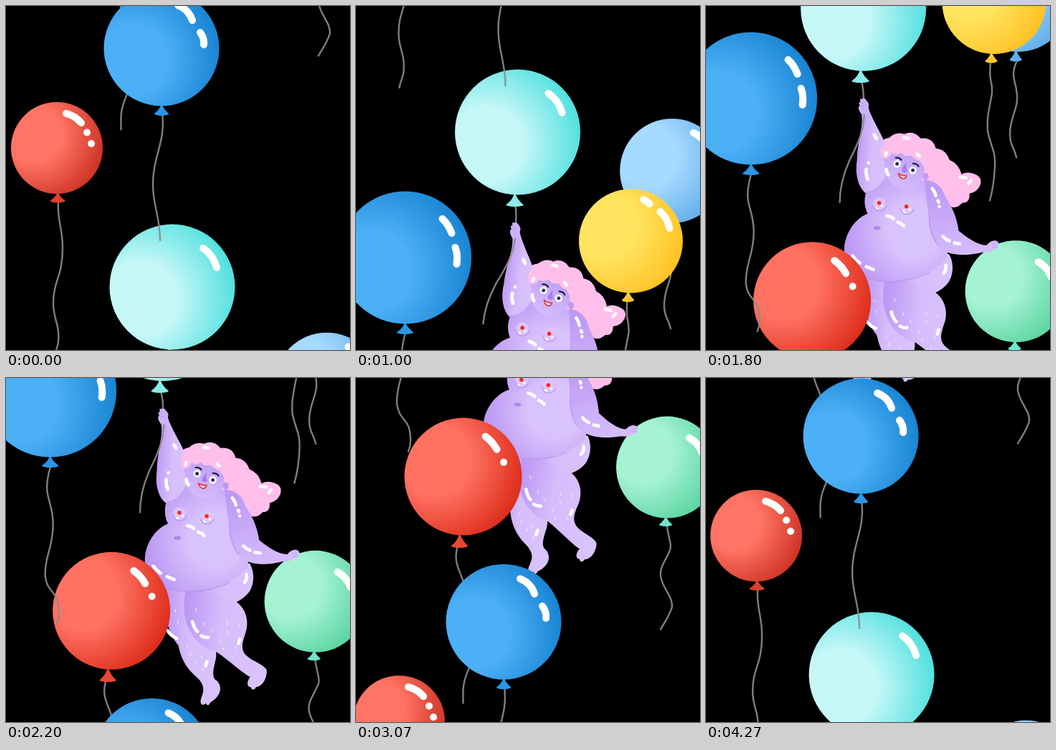
Recreate the animation shown at these times as an HTML page. Size 480 by 480 pixels, loop 4.34 s.

```html
<!DOCTYPE html>
<html lang="en">
<head>
<meta charset="utf-8">
<title>Balloons</title>
<style>
html, body { margin: 0; width: 100%; height: 100%; overflow: hidden; background: #000; }
svg { display: block; width: 100vw; height: 100vh; }
.string { fill: none; stroke: #8c8c8c; stroke-opacity: .9; stroke-width: 2.4; stroke-linecap: round; }
.shine { fill: none; stroke: #fff; stroke-width: 10; stroke-linecap: round; }
.glint { fill: none; stroke: #fff; stroke-width: 4.6; stroke-linecap: round; }
.fuzz { fill: none; stroke: #f6edff; stroke-width: 1; stroke-linecap: round; }
.crease { fill: none; stroke: #b898ee; stroke-width: 1.3; stroke-linecap: round; }
</style>
</head>
<body>
<svg id="stage" viewBox="0 0 480 480">
<defs>
  <radialGradient id="skin" cx=".68" cy=".52" r=".72">
    <stop offset=".35" stop-color="#d9c3fc"/><stop offset="1" stop-color="#b892f3"/>
  </radialGradient>
  <linearGradient id="limb" x2="1" y2=".15">
    <stop stop-color="#b993f2"/><stop offset=".5" stop-color="#d6befc"/><stop offset="1" stop-color="#d9c3fc"/>
  </linearGradient>
  <linearGradient id="reach" x1=".5" y1="0" x2=".8" y2="1">
    <stop stop-color="#bd9af4"/><stop offset=".6" stop-color="#cdb0fa"/><stop offset="1" stop-color="#d6befc"/>
  </linearGradient>
  <linearGradient id="face" x1=".2" y1="1" x2=".6" y2="0">
    <stop stop-color="#d6befc"/><stop offset="1" stop-color="#c0a0f5"/>
  </linearGradient>
</defs>
</svg>
<script>
const FPS = 15, LAST = 64, LOOP = 4340, RISE = 14.4, SEAM = 22;
const LEFT = [.25, .6], UPPER = [.26, .36];
const stage = document.getElementById('stage');

// Coordinates inside a balloon are relative to its centre.
const balloons = {
  sky: { x: 447.5, y: 528.5, v: 19.9, r: 72.8, light: '#a6daff', dark: '#5aa8e8', glow: UPPER, tip: '#5eb0ee', knot: [-3, 7.5, 12],
    shine: 'M30-53Q43-47 50-33',
    string: 'M-2 87C-12 110 0 115-1 140C-3 160-11 165-11 188C-11 205-5 205-2 220' },
  green: { x: 445, y: 787, r: 71, light: '#a5f3d3', dark: '#52d09c', glow: UPPER, tip: '#72e3cd', knot: [-2, 8, 10],
    shine: 'M31-41Q43-35 49-20',
    string: 'M0 82C2 100 8 110 3 118C-5 135-10 140-9 152C-6 170 8 180 7 195C2 210-3 215-9 226' },
  teal: { x: 232, y: 392, r: 87.5, light: '#c6f7f7', dark: '#43dddc', glow: LEFT, tip: '#8cebe9', knot: [-4, 11, 15],
    shine: 'M43-54Q57-45 62-27', string: '' },
  yellow: { r: 72.5, light: '#ffe45f', dark: '#ffbf1f', glow: UPPER, tip: '#ffc832', knot: [-4, 7.5, 11],
    shine: 'M18-58L26-52M41-41Q51-32 54-18',
    string: 'M-5 84C-8 115-2 105-3 128C-8 155-10 160-9 180C-4 205 2 205 1 230Q0 255-6 277' },
  red: { x: 160.5, y: 800, r: 82, light: '#ff7262', dark: '#da2614', glow: UPPER, tip: '#e94836', knot: [-5, 10.5, 16],
    shine: 'M31-56Q41-49 47-38M56.5-20h0',
    string: 'M-8 98C-14 120-5 130 0 146C25 190 10 240 8 268C-2 290 0 300 0 316' },
  navy: { x: 75, y: 628.5, v: 18.5, r: 92.5, light: '#4cb0f6', dark: '#137fce', glow: LEFT, tip: '#2a96e5', knot: [0, 10.5, 13],
    shine: 'M52-54Q60-47 65-34M70-14Q74-4 72 9',
    string: 'M0 107C-12 150 4 150 4 186C4 220-8 230-7 258C-4 285 12 275 12 310Q12 318 9 325' },
  blue: { x: 217, y: 59, r: 80.5, light: '#4cb0f6', dark: '#137fce', glow: LEFT, tip: '#2a96e5', knot: [0, 9, 12],
    shine: 'M23-60Q38-54 43-39M54-22Q60-14 59-5',
    string: 'M1 92C6 130-12 150-12 190C-12 220-2 235-2 268' },
  small: { x: 71, r: 64, light: '#ff7464', dark: '#c92d1f', glow: UPPER, tip: '#d9402f', knot: [1, 9.5, 11],
    shine: 'M13-48Q25-45 34-35M42-21.5h0M48-6h0',
    string: 'M2 75C0 100 8 110 8 140C8 180-5 185-5 217C-5 240 4 245 2 270C1 280-3 285-4 293' },
  corner: { r: 79, light: '#ff7262', dark: '#df2f20', glow: UPPER, tip: '#e94836', knot: [0, 9, 14], shine: '', string: '' }
};

function balloon(id) {
  const { r, light, dark, glow: [cx, cy], tip, knot: [k, w, h], shine, string } = balloons[id];
  return `<radialGradient id="${id}Fill" cx="${cx}" cy="${cy}" r=".82">
      <stop offset=".36" stop-color="${light}"/><stop offset="1" stop-color="${dark}"/></radialGradient>
    <g id="${id}"><path class="string" d="${string}"/>
      <path d="M${k} ${r - 1}Q${k - 2} ${r + h * .5} ${k - w} ${r + h - 1}Q${k} ${r + h + 2} ${k + w} ${r + h - 1}Q${k + 3} ${r + h * .5} ${k} ${r - 1}Z"
        fill="${tip}" stroke="${tip}" stroke-width="2" stroke-linejoin="round"/>
      <circle r="${r}" fill="url(#${id}Fill)"/><path class="shine" d="${shine}"/></g>`;
}

const eye = (x, y) => `<circle cx="${x}" cy="${y}" r="5.2" fill="#fff"/>
  <circle cx="${x}" cy="${y}" r="2.6" fill="#4d5670"/><circle cx="${x}" cy="${y}" r="1.2" fill="#0a0a14"/>`;
const breast = (x, y) => `<circle cx="${x}" cy="${y}" r="9" fill="#d9c4fc"/>
  <path class="crease" d="M${x - 9} ${y + 2}q3 9 11 8q6-1 8-7"/>
  <circle cx="${x}" cy="${y}" r="4.4" fill="#f3c3e8"/><circle cx="${x}" cy="${y - 1}" r="2.8" fill="#ee2b23"/>
  <path class="glint" style="stroke-width:2.4" d="M${x - 4} ${y + 6}l2 1M${x + 4} ${y + 4}l1-1"/>`;

const legs = `<g transform="translate(5 0)">
  <path fill="url(#limb)" d="M213 372C213 420 222 445 234 460C238 482 248 495 260 505C270 515 270 522 266 532
    C262 542 267 546 272 541C274 546 277 543 278 540C292 532 296 520 288 510C280 506 282 496 286 480C290 465 280 430 262 400L250 375Z"/>
  <path fill="url(#limb)" d="M334 346C341 356 342 376 332 388C318 404 298 407 284 400L258 375Z"/>
  <path fill="url(#limb)" d="M246 378C241 400 240 426 253 444C260 458 275 466 288 470C305 482 322 498 334 505
    C328 512 330 520 335 519C336 525 341 522 342 519C352 518 358 505 357 495C352 486 338 484 328 474C320 465 324 455 329 440
    C334 420 324 402 308 396Z"/>
  <path class="glint" d="M254 427q2 9 7 14M266 447q6 3 10 2M219 439q6 9 13 11M320 452l-2 6M274 483l-2 6M330 362q1 7-3 11"/>
  <path class="fuzz" d="M258 408l2 4M270 428l1 4M280 438l2 4M292 452l1 4M302 440l1 4M314 462l1 4M308 476l2 3
    M296 464l2 3M250 470l1 4M258 482l2 4M266 475l1 4M268 492l1 4M246 460l1 4M302 428l1 4M318 430l1 4M230 410l1 4M233 425l1 4"/>
</g>`;

const woman = `<g id="woman">
  <path class="string" d="M217 104Q221 118 220 134"/>
  ${legs}
  <path fill="#ffbfea" d="M251 215Q241 210 244 199Q242 186 256 184Q266 175 277 179Q290 173 300 185Q317 183 321 199
    Q335 200 340 215Q353 220 357 235Q364 231 373 234Q387 238 383 250Q379 260 368 262Q369 275 358 275Q350 284 341 280
    Q332 282 328 262L300 250Z"/>
  <path fill="url(#limb)" d="M217 149C221 167 212 187 211 216C208 236 213 254 224 262L262 264L258 236
    C250 225 254 212 252 200C250 185 239 172 229 148Z"/>
  <path fill="url(#skin)" d="M224 259C220 272 222 282 226 290C205 298 190 325 194 348C200 372 225 386 255 385
    C280 384 312 376 334 354C341 345 337 330 332 315L326 262C318 246 308 242 296 244L252 236C244 252 234 259 224 259Z"/>
  <path fill="url(#reach)" d="M305 243C322 244 331 254 334 266C342 278 350 292 353 314C368 326 380 334 392 334
    C398 327 405 326 408 330Q411 333 407 335Q410 340 402 340Q397 345 386 344C365 349 345 349 331 341C316 330 311 312 311 294Z"/>
  <path class="crease" d="M400 333l7-2M400 337l7-1" style="stroke-width:.8"/>
  <path class="string" d="M221 143C223 175 209 198 200 217C190 240 187 256 187 274"/>
  <path fill="#cdb1f9" d="M217 151C213 145 212 141 215 139Q212 134 216 134Q214 128 219 130Q221 127 224 132
    Q229 136 227 142L230 152Z"/>
  <path class="crease" d="M216 135l5 2M215 140l6 1" style="stroke-width:.8"/>
  <ellipse cx="253" cy="214" rx="4" ry="6" fill="#b794f0"/>
  <path fill="url(#face)" d="M252 205C258 200 266 205 274 203C286 203 297 211 303 219C309 236 300 252 284 255C262 258 247 240 250 218Z"/>
  <path fill="#ffbfea" d="M250 214Q241 209 245 198Q254 186 267 188Q288 186 304 200Q318 216 312 238Q305 225 298 216Q291 215 287 209Q277 211 273 205Q264 210 260 205Q256 213 250 214Z"/>
  <ellipse cx="307" cy="238" rx="4" ry="5" fill="#bd9bf3"/>
  ${eye(267, 220.5)}${eye(289, 229.5)}
  <path d="M265 212q5-1 8 3M289 220q6 0 8 4" fill="none" stroke="#171326" stroke-width="2" stroke-linecap="round"/>
  <path d="M280 219Q272 228 274 231Q278 235 282 230Q279 227 280 219Z" fill="#a582e6"/>
  <path d="M269 234Q273 237 280 237Q279 242 274 241Q270 239 269 234Z" fill="#fff" stroke="#e4414e" stroke-width="2" stroke-linejoin="round"/>
  ${breast(242, 276)}${breast(280, 281)}
  <ellipse cx="239" cy="310" rx="5" ry="2.6" fill="#a98ae8"/>
  <path class="crease" d="M196 355Q213 384 255 385Q290 384 312 372M312 293Q311 316 324 334"/>
  <path class="glint" d="M235 180l3 5M227 219h0M224 228q-1 7 2 14M252 205l-1 3M252 228q0 5 3 8M277 184l6 1M295 207l3 3
    M316 255q4 5 5 10M324 272l1 2M326 280h0M253 293q6 1 9 4M268 302q6 2 8 5M331 322q5 5 9 6M347 331l7 1
    M205 349q4 6 10 10M224 364l10 4M355 239l8 1M370 244l-3 4"/>
</g>`;

stage.innerHTML += ['sky', 'green'].map(balloon).join('') + woman +
  ['teal', 'yellow', 'red', 'navy', 'blue', 'small', 'corner'].map(balloon).join('');

const place = (id, x, y, turn = '') =>
  document.getElementById(id).setAttribute('transform', `translate(${x} ${y})${turn}`);

// Wraps a steady climb so that strings clear the top before re-entry.
function climb(y, v, n) {
  const period = SEAM + LAST * v, top = -330;
  return ((y - v * n - top) % period + period) % period + top;
}

function along(keys, n) {
  let i = 1;
  while (i < keys.length - 1 && n > keys[i][0]) i++;
  const [a, p] = keys[i - 1], [b, q] = keys[i];
  return p + (q - p) * (n - a) / (b - a);
}

function draw(n) {
  const a = 2 * Math.PI * n / 69;
  const sway = -6.7 * (1 - Math.cos(a)) - 1.2 * Math.sin(a) ** 2;

  for (const id of ['sky', 'green', 'teal', 'red', 'navy', 'blue']) {
    const { x, y, v = RISE } = balloons[id];
    place(id, x + sway, climb(y, v, n));
  }

  const yellowX = along([[0, 368], [7, 375], [15, 383.5], [27, 402], [39, 415]], n);
  const k = n - 7;
  place('yellow', yellowX, n <= 27 ? 497.5 - 18.55 * k - .33 * k * k : -6 - 20.75 * (n - 27));

  place('small', balloons.small.x + sway,
    n < 30 ? 198 - 18.5 * n - .443 * n * n : 1141.6 - RISE * n);
  place('corner', 515 + 3.5 * (n - 54), 321 - 36 * (n - 54));

  // She swings from the knot of the teal balloon.
  const swing = 5.3 * (.907 - Math.cos((n - 31.5) / 65 * 2 * Math.PI));
  place('woman', sway + 12, 388.5 - RISE * n, ` rotate(${swing} 216 97)`);
}

function tick(now) {
  const t = now % LOOP;
  draw(Math.min(LAST, Math.floor((t + 3.4) * FPS / 1000)));
  requestAnimationFrame(tick);
}
tick(performance.now());
</script>
</body>
</html>
```
